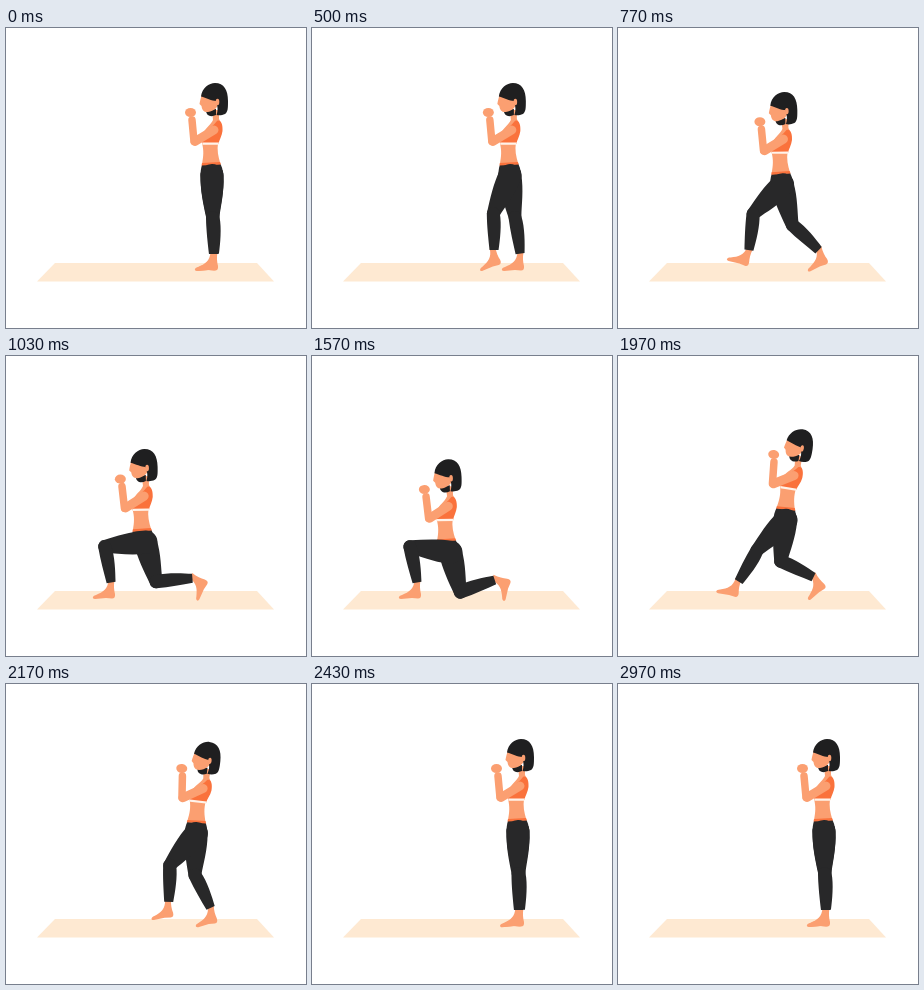
Recreate the animation shown at these times as an HTML page. Size 300 px wide and 300 px high, loop 3.01 s.

```html
<!DOCTYPE html>
<html lang="en">
<head>
<meta charset="utf-8">
<title>Lunge exercise</title>
<style>
  html, body { margin: 0; width: 100%; height: 100%; overflow: hidden; background: #fff; }
  svg { display: block; width: 100vw; height: 100vh; }
  .skin { fill: #fb9f71; }
  .top { fill: #fa723c; }
  .hair { fill: #1f1f20; }
  .pants { fill: #282829; }
  .far .pants { fill: #1f1f20; }
  .arm { fill: none; stroke: #fb9f71; stroke-linecap: round; }
</style>
</head>
<body>
<svg viewBox="0 0 300 300">
  <defs>
    <path id="thigh" class="pants" d="M-11.500-1C-12 14-9 28-6.500 41A6.500 6.500 0 0 0 6.500 41C8 30 12 16 11.500 0A11.500 11.500 0 0 0-11.500-1Z"/>
    <path id="shank" class="pants" d="M-6.500 0C-6.500 13-5 26-4 36.500L5 36.500C6.500 27 8.500 11 6.500 0A6.500 6.500 0 0 0-6.500 0Z"/>
    <path id="foot" class="skin" d="M-2.500-5H3.500C2.500 1 3 5 4 9Q4.500 13.500 1 13.500L-5 13L-16 14C-19 14-19 11-15 10C-8 7-3 4-2.500-5Z"/>
  </defs>

  <path d="M49 235H251L268 253.500H31Z" fill="#fee9d2"/>

  <g id="farLeg" class="far">
    <use href="#foot"/><use href="#thigh"/><use href="#shank"/>
  </g>

  <g id="torso">
    <path class="skin" d="M-10-33H6C5-26 6-20 8.500-12H-10C-8.500-20-8-25-10-33Z"/>
    <path class="pants" d="M-10-11L8.500-12C11-7 11.500-2 11 2H-11C-12-3-11-8-10-11Z"/>
    <path class="top" d="M-10-13L8-14L9-11.500L-10.500-10.500Z"/>
    <path class="skin" d="M0-66H7V-57L9-53L5-40L-9-42C-8-47-1-51 1-56Z"/>
    <path class="top" d="M5-55C9-57 11-51 10.500-45C10-40 7-36 6.500-32H-9.500C-11-37-10-41-7-44C-3-47 2-51 5-55Z"/>
    <path d="M-9.800-33.500H7L6.300-31.300H-9.500Z" fill="#fff3ea"/>
    <path class="arm" stroke-width="9" d="M2-46L-17-34.500"/>
    <path class="arm" stroke-width="7.500" d="M-18-34.500L-20-56"/>
    <ellipse class="skin" cx="-21.500" cy="-63.500" rx="5.500" ry="4.500"/>
    <path class="hair" d="M-6-66C-6-60-1-58.500 4-61V-67Z"/>
    <path class="skin" d="M-10-82C-11-79-12-75-12.500-72L-10.500-70C-10-66-8-63.500-4-64C2-65 7-69 7-75C7-84-2-88-10-82Z"/>
    <path class="hair" d="M-11-79.500C-10-88-3-93 3-93C12-93 16-86 16-75C16-68 16-64 13-62C10-60.500 7-60.500 4.500-61C6-65 6-69 4-75C0-75-6-78-11-79.500Z"/>
    <ellipse class="skin" cx="5.500" cy="-74" rx="1.800" ry="3.200"/>
  </g>

  <g id="nearLeg">
    <use href="#foot"/><use href="#thigh"/><use href="#shank"/>
  </g>
</svg>

<script>
const LOOP = 3010, THIGH = 41, SHANK = 39;
const STAND = { x: 206, y: 148 }, ANKLE = { x: 207, y: 229 }, TOE = { x: 193, y: 242 };
const { sin, cos, PI, hypot, atan2, sqrt, max } = Math;

function ramp(t, from, to) {
  const u = Math.min(1, max(0, (t - from) / (to - from)));
  return u * u * (3 - 2 * u);
}

// Rises from 0 to 1 between a and b, falls back between c and d
const pulse = (t, a, b, c, d) => ramp(t, a, b) - ramp(t, c, d);

const byId = id => document.getElementById(id);
const torso = byId('torso'), nearLeg = byId('nearLeg'), farLeg = byId('farLeg');

function place(el, x, y, angle) {
  el.setAttribute('transform', `translate(${x} ${y}) rotate(${angle})`);
}

const downAngle = (dx, dy) => atan2(-dx, dy) * 180 / PI;

// Two-bone leg with the knee bending to the left
function poseLeg(leg, hx, hy, ax, ay, footAngle) {
  const dx = ax - hx, dy = ay - hy, dist = hypot(dx, dy);
  const along = (THIGH ** 2 - SHANK ** 2 + dist ** 2) / (2 * dist);
  const bend = sqrt(max(0, THIGH ** 2 - along ** 2));
  const kx = hx + (dx * along - dy * bend) / dist;
  const ky = hy + (dy * along + dx * bend) / dist;
  const [foot, thigh, shank] = leg.children;
  place(foot, ax, ay, footAngle);
  place(thigh, hx, hy, downAngle(kx - hx, ky - hy));
  place(shank, kx, ky, downAngle(ax - kx, ay - ky));
}

function draw(t) {
  const travel = pulse(t, 340, 1100, 1570, 2440);
  const dip = pulse(t, 600, 1220, 1520, 2260);
  const step = pulse(t, 250, 1020, 1820, 2470);
  const heel = -72 * pulse(t, 520, 1200, 1570, 2370);

  const x = STAND.x - 70.5 * travel, y = STAND.y + 49 * dip;
  const lean = 10 * sin(PI * ramp(t, 1570, 2440)) - 1.5 * dip;
  place(torso, x, y, lean);

  // The hips push back as the body sinks
  const hipX = x + 3 * dip;
  const lift = 9 * sin(PI * step) ** 2;
  poseLeg(nearLeg, hipX, y, ANKLE.x - 102 * step, ANKLE.y - lift, -18 * sin(2 * PI * step));

  // The standing foot turns about its toes
  const r = heel * PI / 180, dx = 15, dy = -13;
  poseLeg(farLeg, hipX, y,
    TOE.x + dx * cos(r) - dy * sin(r), TOE.y + dx * sin(r) + dy * cos(r), heel);
}

const start = performance.now();
function tick() {
  draw((performance.now() - start) % LOOP);
  requestAnimationFrame(tick);
}
tick();
</script>
</body>
</html>
```
